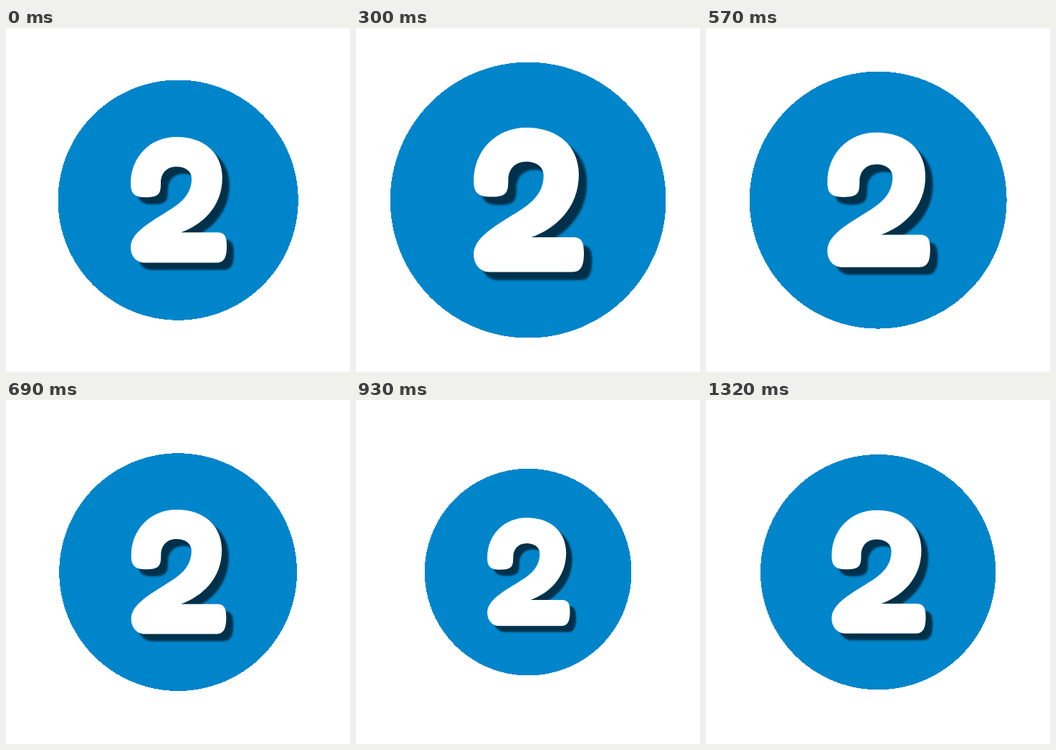
An HTML page with a canvas that plays this animation: 480x480 px, repeating every 1.35 s.

```html
<!DOCTYPE html>
<html lang="en">
<head>
<meta charset="utf-8">
<title>Pulsing number</title>
<style>
  html, body { margin: 0; width: 100%; height: 100%; overflow: hidden; background: #fff; }
  canvas { display: block; }
</style>
</head>
<body>
<canvas id="stage" width="480" height="480" role="img" aria-label="2"></canvas>
<script>
const ctx = document.getElementById("stage").getContext("2d");
const SIZE = 480, CENTER = 240.12, LOOP = 1350, STEP = 30;
const RADIUS = 167.6, SWING = 0.15, SHADOW_OFFSET = 9.9;

// The chunky digit at scale 1, in stage coordinates.
const digit = new Path2D(`
  M174 217
  C174 180 201 152 238 152
  C277 152 301.8 175 301.8 209
  C301.8 250 273 275 244 285.3
  H295
  C305 285.3 308 291 308 304
  C308 319 305 327.5 294 327.5
  H193
  C182 327.5 174 318.5 174 306
  C174 287 198 273 217 261
  C237 248.5 259 237 259 210
  C259 199 249 193.5 238 193.5
  C223 193.5 216 204 216 216
  C216 231 214 236.2 195 236.2
  C179 236.2 174 231 174 217Z`);

// Filled row by row so the rim stays crisp, without antialiasing.
function drawDisc(radius) {
  ctx.fillStyle = "#0085cb";
  for (let y = 0; y < SIZE; y++) {
    const dy = y + 0.5 - CENTER;
    if (Math.abs(dy) >= radius) continue;
    const half = Math.sqrt(radius * radius - dy * dy);
    const left = Math.round(CENTER - half);
    ctx.fillRect(left, y, Math.round(CENTER + half) - left, 1);
  }
}

function drawDigit(scale) {
  ctx.save();
  ctx.translate(CENTER, CENTER);
  ctx.scale(scale, scale);
  ctx.translate(-CENTER, -CENTER);
  ctx.shadowColor = "rgba(0, 0, 0, 0.63)";
  ctx.shadowBlur = 2.4 * scale;
  ctx.shadowOffsetX = ctx.shadowOffsetY = SHADOW_OFFSET * scale;
  ctx.fillStyle = "#fff";
  ctx.fill(digit);
  ctx.restore();
}

function draw(now) {
  const time = Math.floor((now % LOOP) / STEP) * STEP;
  const scale = 1 + SWING * Math.sin(2 * Math.PI * time / LOOP);
  ctx.fillStyle = "#fff";
  ctx.fillRect(0, 0, SIZE, SIZE);
  drawDisc(RADIUS * scale);
  drawDigit(scale);
}

let start;
function tick(now) {
  start ??= now;
  draw(now - start);
  requestAnimationFrame(tick);
}
draw(0);
requestAnimationFrame(tick);
</script>
</body>
</html>
```
